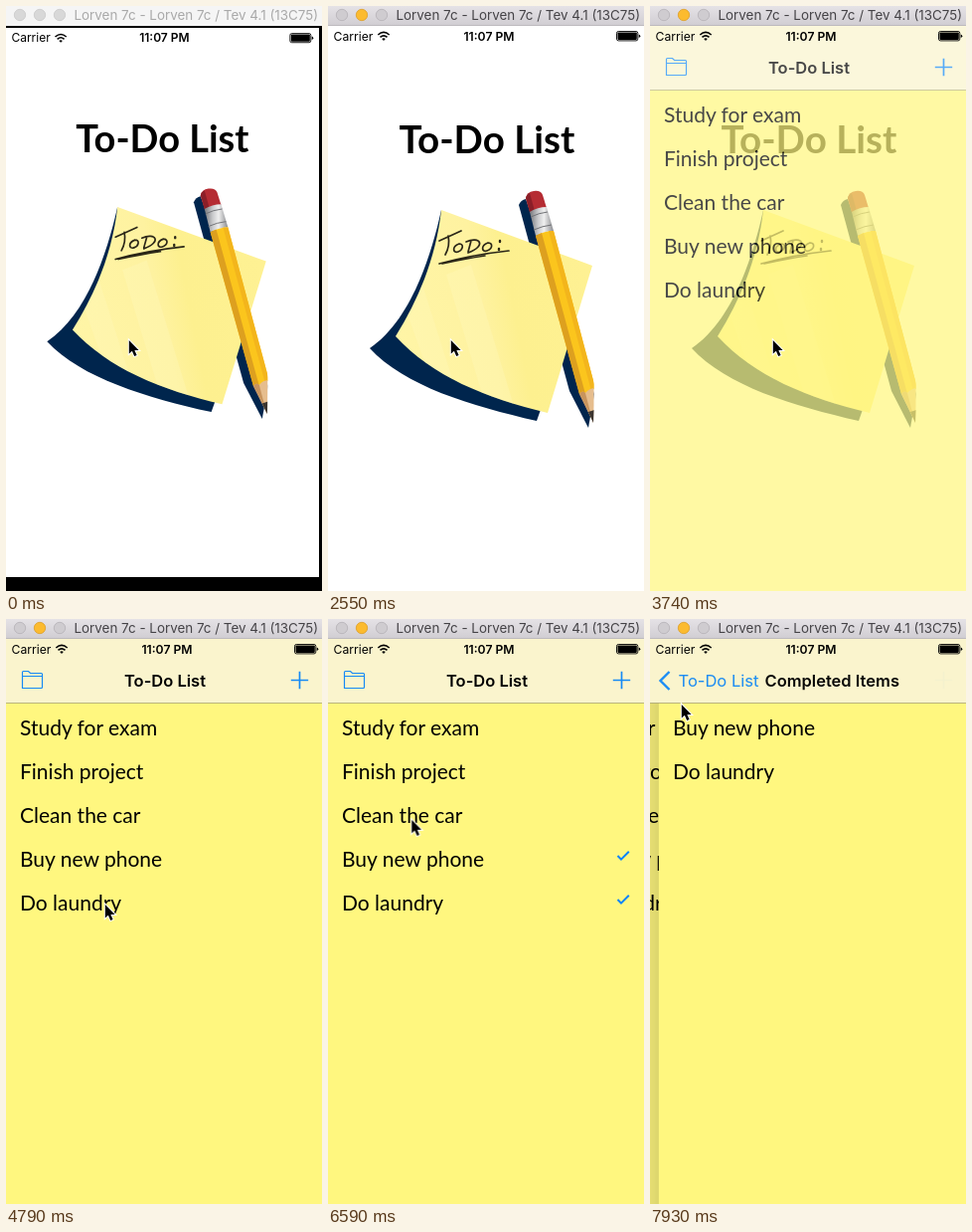
Write an HTML page that moves like this. It is 318 px wide and 588 px high and loops after 8 s.

```html
<!DOCTYPE html>
<html lang="en">
<head>
<meta charset="utf-8">
<title>To-Do List</title>
<style>
@property --p { syntax: '<number>'; inherits: true; initial-value: 0; }

html, body { margin: 0; width: 100%; height: 100%; overflow: hidden; background: #000; }
svg { display: block; width: 100%; height: 100%; }
text { font-family: Inter, "Liberation Sans", sans-serif; white-space: pre; }

.phone, .app, .cursor, .press, .tick, .folder, .idle, .active {
  animation: 8s step-end infinite;
}

/* window frame */
.bar-text { font-size: 13.4px; }
.idle { animation-name: idle; }
.active { animation-name: active; }
@keyframes idle { 0% { opacity: 1; } 18.75%, 100% { opacity: 0; } }
@keyframes active { 0% { opacity: 0; } 18.75%, 100% { opacity: 1; } }

/* the screen starts slightly smaller than its window */
.phone { animation-name: grow; }
@keyframes grow {
  0% { transform: translate(0, 2.8px) scale(.984, .972); }
  1.875%, 100% { transform: none; }
}

.status { font-size: 12.2px; }
.strong { font-weight: 600; }
.splash-title { font: 700 38.6px Lato, sans-serif; }
.rows text { font: 400 21px Lato, sans-serif; }
.nav text { font-size: 16.5px; }
.ink { fill: none; stroke: #2b2718; stroke-width: 1.7; stroke-linecap: round; stroke-linejoin: round; }
.blue { fill: none; stroke: #168af5; stroke-width: 1.2; }
.plus { stroke-width: 1.7; }
.chevron { stroke-width: 2.4; }

/* splash dissolves into the list, later the next page is pushed by --p */
.app { animation-name: fade, push; }
@keyframes fade {
  0% { opacity: 0; }
  45% { opacity: .23; }
  46.75% { opacity: .72; }
  48.625%, 100% { opacity: 1; }
}
@keyframes push {
  0% { --p: 0; }
  95.375% { --p: .009; }
  97.25% { --p: .74; }
  99.125%, 100% { --p: .972; }
}
.old-page { transform: translateX(calc(var(--p) * -95.4px)); }
.dim { opacity: calc(var(--p) * .1); }
.new-page { transform: translateX(calc((1 - var(--p)) * 318px)); }
.shade { opacity: min(var(--p) * 200, 1 - var(--p) * .75); }
.leave { opacity: calc(1 - var(--p)); }
.enter { opacity: var(--p); }
.to-back { transform: translateX(calc(var(--p) * -93px)); }
.new-title { transform: translateX(calc((1 - var(--p)) * 150px)); }

.press { opacity: 0; }
.press.a { animation-name: press-a; }
.press.b { animation-name: press-b; }
@keyframes press-a {
  0% { opacity: 0; }
  67.375% { opacity: 1; }
  69.25% { opacity: .5; }
  71.125%, 100% { opacity: 0; }
}
@keyframes press-b {
  0% { opacity: 0; }
  78.625% { opacity: 1; }
  80.5% { opacity: .5; }
  82.375%, 100% { opacity: 0; }
}

.tick { fill: none; stroke: #0a84ff; stroke-width: 2; }
.tick.a { animation-name: tick-a; }
.tick.b { animation-name: tick-b; }
@keyframes tick-a {
  0% { opacity: 0; }
  67.375% { opacity: 1; }
  93.5%, 100% { opacity: 0; }
}
@keyframes tick-b {
  0% { opacity: 0; }
  78.625% { opacity: 1; }
  93.5%, 100% { opacity: 0; }
}

.folder { animation-name: folder; }
@keyframes folder {
  0% { opacity: 1; }
  93.5% { opacity: .3; }
  97.25%, 100% { opacity: 0; }
}

.cursor { animation-name: point; }
@keyframes point {
  0% { transform: translate(123px, 335px); }
  52.375% { transform: translate(123px, 335px); animation-timing-function: steps(5, start); }
  61.7% { transform: translate(99px, 286px); }
  71.125% { transform: translate(99px, 286px); animation-timing-function: steps(3, start); }
  76.7% { transform: translate(99px, 236px); }
  82.375% { transform: translate(99px, 236px); animation-timing-function: steps(5, start); }
  91.55% { transform: translate(21px, 60px); }
  97.25% { transform: translate(23px, 65px); }
  99.125%, 100% { transform: translate(31px, 85px); }
}
</style>
</head>
<body>
<svg viewBox="0 0 318 588" preserveAspectRatio="none">
  <defs>
    <linearGradient id="bar" x2="0" y2="1">
      <stop stop-color="#e5e2e6"/><stop offset="1" stop-color="#d0cdd2"/>
    </linearGradient>
    <linearGradient id="paper" x1="0" y1=".6" x2="1" y2=".4">
      <stop stop-color="#fff5a6"/><stop offset=".45" stop-color="#fef2a0"/>
      <stop offset=".6" stop-color="#fdf08f"/><stop offset="1" stop-color="#fef193"/>
    </linearGradient>
    <linearGradient id="metal">
      <stop stop-color="#77787c"/><stop offset=".35" stop-color="#c9cacc"/>
      <stop offset=".6" stop-color="#efefef"/><stop offset="1" stop-color="#8a8b8f"/>
    </linearGradient>
    <linearGradient id="edge">
      <stop stop-color="#000" stop-opacity="0"/><stop offset="1" stop-color="#000" stop-opacity=".17"/>
    </linearGradient>
    <path id="sheet" d="M114 205L266 261L221 409C158 394 105 372 68 332C92 294 109 251 114 205Z"/>
    <clipPath id="on-sheet"><use href="#sheet"/></clipPath>
    <clipPath id="art"><rect x="40" y="180" width="227.5" height="250"/></clipPath>
  </defs>

  <rect width="318" height="588"/>

  <g class="phone">
    <rect y="20" width="320" height="568" fill="#fff"/>

    <g class="splash">
      <text class="splash-title" x="71.5" y="148">To-Do List</text>
      <g clip-path="url(#art)">
        <g fill="#00254d">
          <path d="M114 205C103 255 82 317 42 344C77 382 144 402 210 417L216 400L120 300Z"/>
          <path d="M192 200Q194 195 199 194L268 390L262 424L243 387Z"/>
        </g>
        <use href="#sheet" fill="url(#paper)"/>
        <g fill="#fff8bd" opacity=".32" clip-path="url(#on-sheet)">
          <path d="M80 310L105 380L130 390L95 280Z"/>
          <path d="M119 270L155 390L188 405L144 260Z"/>
        </g>
        <g class="ink">
          <path d="M112 236Q121 232 134 226M121 231Q123 241 118 250"/>
          <path d="M132 239C124 242 126 249 131 247C136 245 137 239 132 239"/>
          <path d="M144 236L141 247M139 237C153 231 160 241 141 248"/>
          <path d="M161 238C153 241 155 248 160 246C166 244 166 238 161 238"/>
          <path d="M173 236v1M172 244v1" stroke-width="2.4"/>
          <path d="M112 259Q145 250 182 246M115 259Q138 254 158 251"/>
        </g>
        <path d="M203 207L199 193Q200 187 207 186Q214 185 216 190L220 203Z" fill="#b52c33"/>
        <path d="M203 207L199 193Q200 189 203 188L208 206Z" fill="#8b1f28"/>
        <path d="M203 207Q211 202 220 202L227 226Q218 226 209 231Z" fill="url(#metal)"/>
        <path d="M204 212Q212 208 221 207M207 225Q216 221 225 220" fill="none" stroke="#727377"/>
        <path d="M209 231Q218 226 227 226L269 384L262 389L253 390Z" fill="#fbc51d"/>
        <path d="M209 231L215 228L259 390L253 390Z" fill="#dda01f"/>
        <path d="M222 226L227 226L269 384L265 387Z" fill="#f3b51c"/>
        <path d="M253 390Q256 386 259 389Q263 384 269 384L267 419Z" fill="#e6bd8d"/>
        <path d="M253 390Q256 386 259 389L266 416Z" fill="#c8945d"/>
        <path d="M262 408L268 406L267 419Z" fill="#3a342f"/>
      </g>
    </g>

    <g class="app">
      <rect y="20" width="320" height="568" fill="#fff77f"/>
      <g class="old-page">
        <rect class="press a" y="260.5" width="320" height="44" fill="#d9d9d9"/>
        <rect class="press b" y="216.5" width="320" height="43.5" fill="#d9d9d9"/>
        <g class="rows">
          <text x="14" y="117">Study for exam</text>
          <text x="14" y="161">Finish project</text>
          <text x="14" y="205">Clean the car</text>
          <text x="14" y="249">Buy new phone</text>
          <text x="14" y="293">Do laundry</text>
        </g>
        <path class="tick a" d="M291.5 282L295 285.6L302.8 277.8"/>
        <path class="tick b" d="M291.5 238L295 241.6L302.8 233.8"/>
      </g>
      <rect class="dim" y="84" width="320" height="504"/>
      <g class="new-page">
        <rect class="shade" x="-9" y="84" width="9" height="504" fill="url(#edge)"/>
        <rect y="84" width="320" height="504" fill="#fff77f"/>
        <g class="rows">
          <text x="14" y="117">Buy new phone</text>
          <text x="14" y="161">Do laundry</text>
        </g>
      </g>

      <g class="nav">
        <rect y="20" width="320" height="64" fill="#faf4cd"/>
        <rect y="84" width="320" height=".8" fill="#aaa57c"/>
        <path class="blue folder" d="M16.5 69.5V53.5Q16.5 52.5 17.5 52.5H22.5L24.5 54.5H35.5Q36.5 54.5 36.5 55.5V68.5Q36.5 69.5 35.5 69.5ZM16.5 57.5H36.5"/>
        <path class="blue plus leave" d="M286.8 61.5H304.2M295.5 52.8V70.2"/>
        <g class="to-back">
          <text class="strong leave" x="119" y="67.9">To-Do List</text>
          <text class="enter" x="119" y="67.9" fill="#168af5">To-Do List</text>
        </g>
        <path class="blue chevron enter" d="M19.5 53L10.5 62L19.5 71"/>
        <g class="new-title"><text class="strong enter" x="111.3" y="67.9">Completed Items</text></g>
      </g>
    </g>

    <g class="status">
      <text x="5.5" y="34.5">Carrier</text>
      <path d="M50.3 29Q56 23.8 61.7 29M52.5 31.4Q56 28.2 59.5 31.4" fill="none" stroke="#000" stroke-width="1.6"/>
      <path d="M54.2 33Q56 31.6 57.8 33L56 35Z"/>
      <text class="strong" x="162" y="34.5" text-anchor="middle">11:07 PM</text>
      <rect x="290.5" y="25.5" width="21.3" height="9.4" rx="1.8" fill="none" stroke="#000" stroke-width=".9"/>
      <rect x="291.5" y="26.5" width="19.3" height="7.4" rx=".8"/>
      <path d="M312.7 28.6Q314.3 29 314.3 30.3Q314.3 31.6 312.7 32Z"/>
    </g>
  </g>

  <g class="idle">
    <rect width="318" height="20" fill="#f5f5f5"/>
    <g fill="#d8d8d8" stroke="#c9c9c9" stroke-width=".8">
      <circle cx="14" cy="9" r="5.7"/><circle cx="34" cy="9" r="5.7"/><circle cx="54" cy="9" r="5.7"/>
    </g>
    <text class="bar-text" x="68.5" y="14" fill="#a9a9a9">Lorven 7c - Lorven 7c / Tev 4.1 (13C75)</text>
  </g>
  <g class="active">
    <rect width="318" height="20" fill="url(#bar)"/>
    <rect y="19.3" width="318" height=".7" fill="#b5b2b7"/>
    <g fill="#cfccd0" stroke="#b5b2b7" stroke-width=".8">
      <circle cx="14" cy="9" r="5.7"/><circle cx="54" cy="9" r="5.7"/>
      <circle cx="34" cy="9" r="5.7" fill="#fcbb2f" stroke="#dd9f28"/>
    </g>
    <text class="bar-text" x="68.5" y="14" fill="#454347">Lorven 7c - Lorven 7c / Tev 4.1 (13C75)</text>
  </g>

  <path class="cursor" d="M.8 1V14.6L3.9 11.8L6.2 17L8.6 16L6.4 11H10.6Z" stroke="#fff" stroke-width="2" paint-order="stroke"/>
</svg>
</body>
</html>
```
